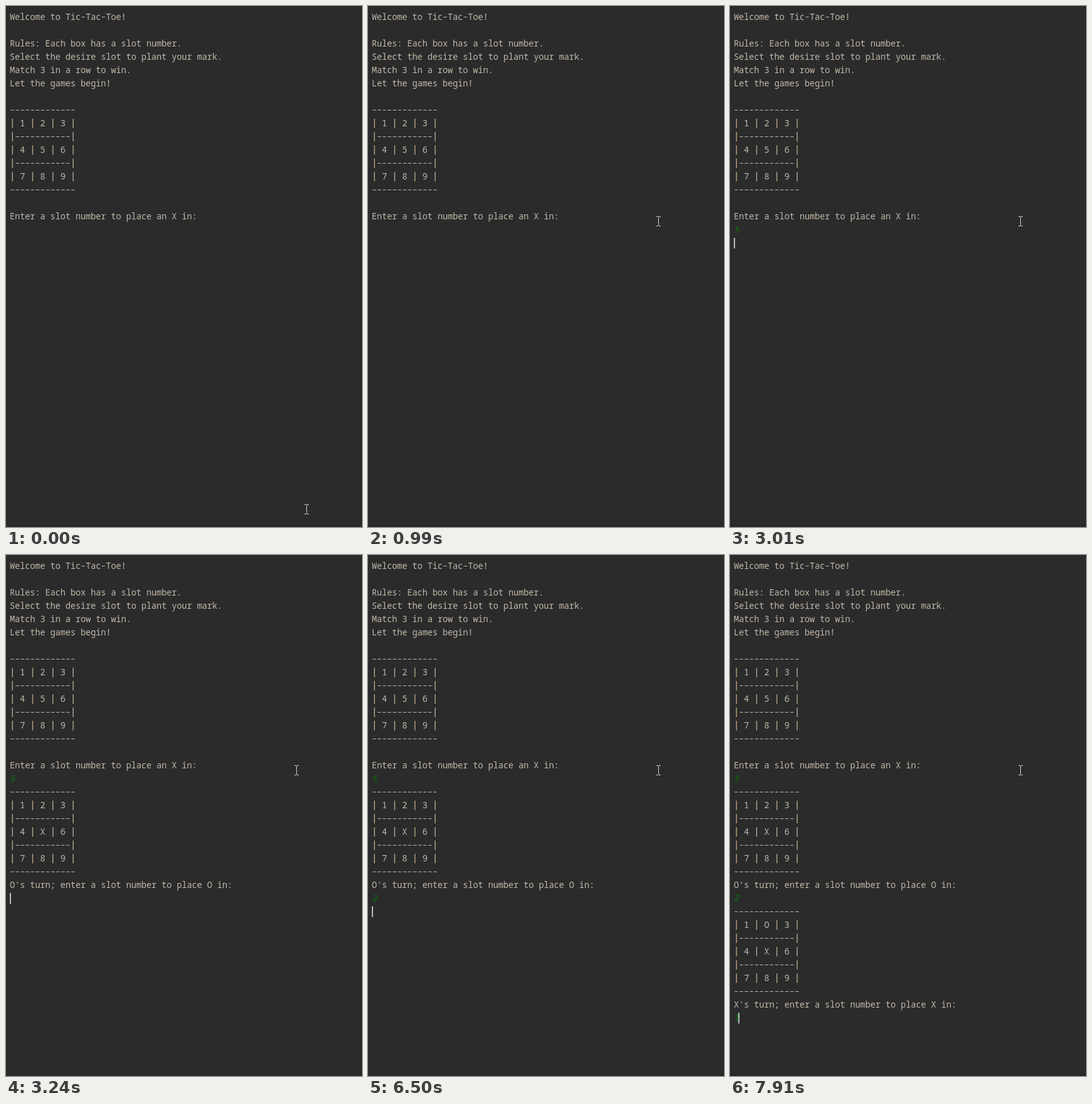
An HTML page with a canvas that plays this animation: 563 by 823 pixels, repeating every 8000 ms.

```html
<!DOCTYPE html>
<html lang="en">
<head>
<meta charset="utf-8">
<title>Tic-Tac-Toe console</title>
<style>
html, body { margin: 0; width: 100%; height: 100%; overflow: hidden; background: #2b2b2b; }
canvas { display: block; }
</style>
</head>
<body>
<canvas id="stage" width="563" height="823"></canvas>
<script>
const ctx = document.getElementById('stage').getContext('2d');
const LOOP = 8000, LEFT = 6, CELL = 8, ROW = 21;
const FONT = '500 13.6px "Noto Sans Mono", "DejaVu Sans Mono", monospace';
const TEXT = '#c2b7aa', INPUT = '#087a08';

function board(slots) {
  const rule = '-'.repeat(13), mid = '|' + '-'.repeat(11) + '|';
  const line = i => '| ' + [...slots.slice(i, i + 3)].join(' | ') + ' |';
  return [rule, line(0), mid, line(3), mid, line(6), rule];
}

const intro = [
  'Welcome to Tic-Tac-Toe!', '',
  'Rules: Each box has a slot number.',
  'Select the desire slot to plant your mark.',
  'Match 3 in a row to win.',
  'Let the games begin!', '',
  ...board('123456789'), '',
  'Enter a slot number to place an X in:'
];
const turn = mark => `${mark}'s turn; enter a slot number to place ${mark} in:`;

// Console output: start time, first row, lines, typed by the player or not
const output = [
  { at: 0, row: 0, lines: intro },
  { at: 1850, row: 16, lines: ['5'], typed: true },
  { at: 3240, row: 17, lines: [...board('1234X6789'), turn('O')] },
  { at: 5570, row: 25, lines: ['2'], typed: true },
  { at: 6730, row: 26, lines: [...board('1O34X6789'), turn('X')] },
  { at: 7910, row: 34, lines: ['1'], typed: true }
];

// Text caret: time, row, column; no row means hidden
const carets = [
  [0], [530, 15, 38], [990], [1530, 15, 38], [1850, 16, 1], [2550],
  [3010, 17, 0], [3240, 25, 0], [4020], [4480, 25, 0], [5030],
  [5490, 25, 0], [5570, 25, 1], [6500, 26, 0], [6730, 34, 0],
  [7510], [7910, 34, 1]
];

function rect(x, y, w, h, color) {
  ctx.fillStyle = color;
  ctx.fillRect(x, y, w, h);
}

// A bar straddles two pixels, tinted like subpixel-rendered type
function drawBar(x, base) {
  rect(x + 3, base - 12, 1, 15, '#506a80');
  rect(x + 4, base - 12, 1, 15, '#c0965e');
}

function drawLine(str, row, typed) {
  const base = 22 + row * ROW;
  ctx.font = (typed ? 'italic ' : '') + FONT;
  ctx.textAlign = 'center';
  [...str].forEach((ch, i) => {
    const x = LEFT + i * CELL;
    if (ch === '|') drawBar(x, base);
    else if (ch === '-') rect(x + 1.4, base - 5, 5.2, 1, TEXT);
    else if (ch !== ' ') {
      ctx.fillStyle = typed ? INPUT : TEXT;
      ctx.fillText(ch, x + CELL / 2, base);
    }
  });
}

function drawCaret(t) {
  const [, row, col] = carets.filter(c => c[0] <= t).pop();
  if (row !== undefined) rect(LEFT + col * CELL - (col ? 1 : 0), 9 + row * ROW, 2, 17, '#bbbbbb');
}

// The pointer moves in five steps along a curve
function pointer(t) {
  const k = t < 70 ? 0 : Math.min(5, 1 + Math.floor((t - 70) / 75));
  const s = k / 5, r = 1 - s;
  const ease = s * s * (3 - 2 * s);
  return [
    Math.round(r * r * 475 + 2 * r * s * 498 + s * s * 459),
    Math.round(795 - 455 * ease)
  ];
}

function drawPointer(t) {
  const [x, y] = pointer(t);
  const click = t >= 530 && t < 610;
  if (click) {
    ctx.fillStyle = '#8e8c17';
    ctx.beginPath();
    ctx.arc(x - 2, y - 1, 12, 0, Math.PI * 2);
    ctx.fill();
  }
  const color = click ? '#dede78' : '#d2d2d2';
  rect(x, y - 7, 1, 14, color);
  for (const end of [y - 8, y + 7]) {
    rect(x - 3, end, 3, 1, color);
    rect(x + 1, end, 3, 1, color);
  }
}

function draw(t) {
  rect(0, 0, 563, 823, '#2b2b2b');
  rect(0, 819, 563, 4, '#282828');
  rect(562, 0, 1, 823, '#252525');
  for (const { at, row, lines, typed } of output) {
    if (t >= at) lines.forEach((s, i) => drawLine(s, row + i, typed));
  }
  drawCaret(t);
  drawPointer(t);
}

const start = performance.now();
function tick() {
  draw((performance.now() - start) % LOOP);
  requestAnimationFrame(tick);
}
tick();
</script>
</body>
</html>
```
